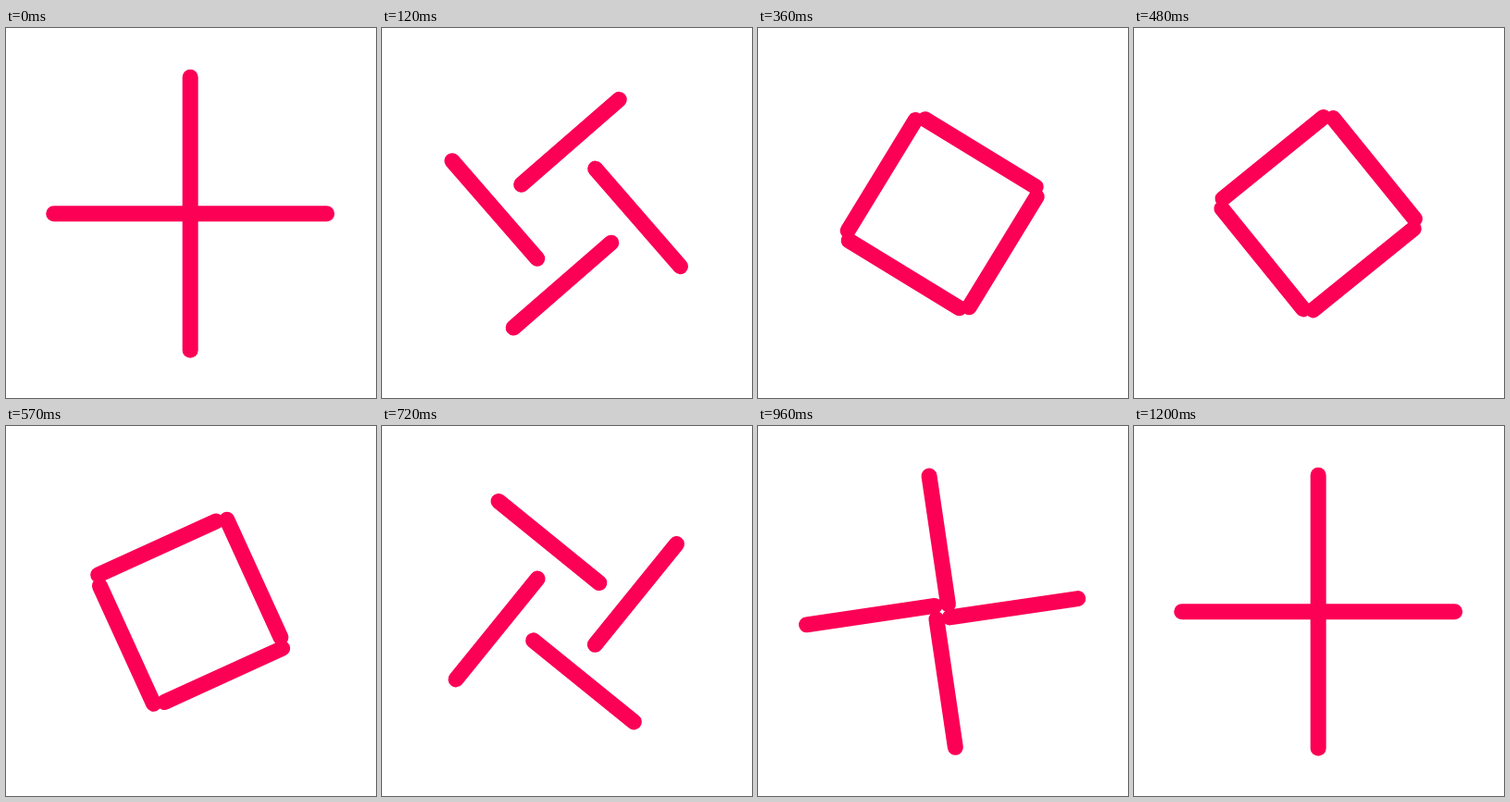
Write an HTML page that moves like this. It is 400 px wide and 400 px high and loops after 3260 ms.

```html
<!DOCTYPE html>
<html lang="en">
<head>
<meta charset="utf-8">
<title>Spinning bars</title>
<style>
  html, body { margin: 0; width: 100%; height: 100%; overflow: hidden; background: #fff; }
  svg { display: block; width: 100%; height: 100%; }
  line { stroke: #fb0055; stroke-width: 17; stroke-linecap: round; }
</style>
</head>
<body>
<svg viewBox="0 0 400 400">
  <g id="cross">
    <line y1="-70" y2="70"/>
    <line y1="-70" y2="70"/>
    <line y1="-70" y2="70"/>
    <line y1="-70" y2="70"/>
  </g>
</svg>
<script>
const LOOP = 3260, STEP = 30, LAST = 40;
const RADIUS = 77.5;
const cross = document.getElementById('cross');
const bars = [...cross.children];

// Cubic Bezier easing with control points (x1, 0) and (x2, 1)
function ease(x, x1, x2) {
  if (x <= 0) return 0;
  if (x >= 1) return 1;
  let lo = 0, hi = 1;
  for (let i = 0; i < 30; i++) {
    const s = (lo + hi) / 2, r = 1 - s;
    const at = 3 * x1 * s * r * r + 3 * x2 * s * s * r + s * s * s;
    if (at < x) lo = s; else hi = s;
  }
  return lo * lo * (3 - 2 * lo);
}

function draw(step) {
  const turn = 90 * ease(step / LAST, 0.333, 0.31);
  const spin = 90 * ease(step / 14, 0.333, 0.086)
             + 90 * ease((step - 17) / (LAST - 17), 0.32, 0.06);
  cross.setAttribute('transform', `translate(199.2 200.7) rotate(${turn})`);
  bars.forEach((bar, i) => bar.setAttribute('transform',
    `rotate(${i * 90}) translate(0 ${-RADIUS}) rotate(${spin})`));
}

const start = performance.now();
function tick() {
  const t = (performance.now() - start) % LOOP;
  draw(Math.min(LAST, Math.floor(t / STEP)));
  requestAnimationFrame(tick);
}
tick();
</script>
</body>
</html>
```
